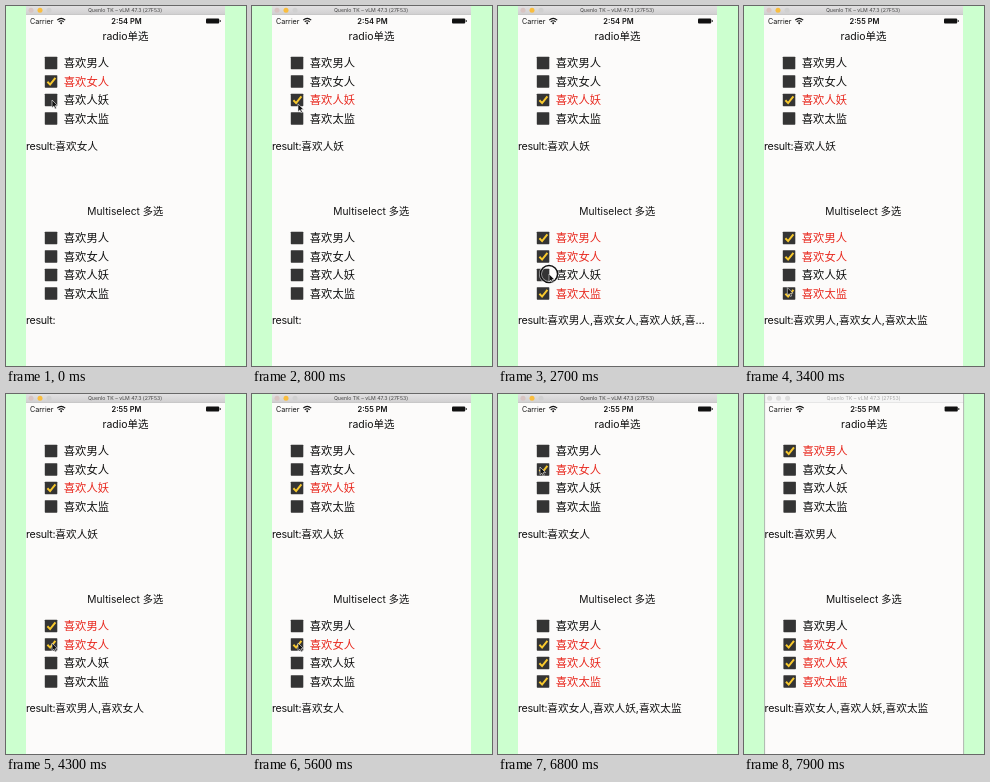
An HTML page that plays this animation: 240 by 360 pixels, repeating every 8000 ms.

```html
<!DOCTYPE html>
<html lang="zh">
<head>
<meta charset="utf-8">
<title>Radio and multiselect</title>
<style>
html, body { margin: 0; width: 100%; height: 100%; overflow: hidden; background: #ccffcf; }
svg { display: block; width: 100vw; height: 100vh; }
text { font-family: Inter, "Noto Sans CJK SC", "Noto Sans CJK", sans-serif; fill: #111; }
.mid { text-anchor: middle; }
.result { font-size: 10.7px; }
.word { letter-spacing: -.3px; }
</style>
</head>
<body>
<svg id="stage" viewBox="0 0 240 360">
  <defs>
    <linearGradient id="chrome" x2="0" y2="1">
      <stop offset="0" stop-color="#e2e1e2"/>
      <stop offset="1" stop-color="#d0cfd0"/>
    </linearGradient>
  </defs>
  <rect width="240" height="360" fill="#ccffcf"/>
  <g id="phone">
    <rect x="20" width="199" height="360" fill="#fcfbfa"/>
    <rect id="bar" x="20" width="199" height="8.6"/>
    <rect id="rule" x="20" y="8.4" width="199" height=".6"/>
    <path id="edges" d="M20 0V360M219 0V360" stroke="#999" stroke-width=".7"/>
    <g id="lights"></g>
    <text id="title" class="mid" x="119" y="6.1" font-size="5.2">Quenlo TK – vLM 47.3 (27F53)</text>
    <text x="24" y="17.6" font-size="7.2">Carrier</text>
    <g fill="none" stroke="#111" stroke-width="1.1">
      <path d="M51.2 14.2q4-3.6 8 0M52.7 15.9q2.5-2.2 5 0"/>
      <circle cx="55.2" cy="17.3" r=".4"/>
    </g>
    <text id="clock" class="mid" x="120.5" y="17.7" font-size="7.5" font-weight="600"></text>
    <rect x="200" y="12.5" width="13.2" height="5" rx="1" fill="#111"/>
    <rect x="213.7" y="14" width="1" height="2" rx=".5" fill="#111"/>
    <text class="mid" x="119.5" y="34.3" font-size="10.5">radio单选</text>
    <text class="mid" x="119.2" y="209.2" font-size="10.2">Multiselect 多选</text>
    <g id="rows"></g>
    <text class="result" x="20" y="144"><tspan class="word">result:</tspan><tspan id="radioResult"></tspan></text>
    <text class="result" x="20" y="318"><tspan class="word">result:</tspan><tspan id="multiResult"></tspan></text>
  </g>
  <g id="cursor">
    <g id="ring" fill="none">
      <circle r="8.6" stroke="#fff" stroke-opacity=".6" stroke-width="3"/>
      <circle r="8.6" stroke="#111" stroke-width="1.5"/>
    </g>
    <path d="M0 0V7.8L1.9 6.1 3.1 8.9 4.4 8.3 3.2 5.6H5.6Z" fill="#111" stroke="#eee" stroke-width=".6"/>
  </g>
</svg>
<script>
const LOOP = 8000, STEP = 100;
const NAMES = ['喜欢男人', '喜欢女人', '喜欢人妖', '喜欢太监'];
const RED = '#e8291f';
const $ = id => document.getElementById(id);

function add(parent, tag, attrs) {
  const el = document.createElementNS('http://www.w3.org/2000/svg', tag);
  for (const k in attrs) el.setAttribute(k, attrs[k]);
  parent.appendChild(el);
  return el;
}

function makeRow(y, name) {
  add($('rows'), 'rect', { x: 38.8, y: y - 6.3, width: 12.5, height: 12.5, rx: .6, fill: '#343434' });
  const tick = add($('rows'), 'path', {
    d: `M41.4 ${y + .3}L44.1 ${y + 3.1} 49.4 ${y - 3.7}`,
    fill: 'none', stroke: '#f8c92e', 'stroke-width': 2
  });
  const label = add($('rows'), 'text', { x: 57.8, y: y + 4.1, 'font-size': 11.3 });
  label.textContent = name;
  return on => {
    tick.style.display = on ? '' : 'none';
    label.style.fill = on ? RED : '#111';
  };
}

const makeList = top => NAMES.map((name, i) => makeRow(top + i * 18.5, name));
const radio = makeList(57), multi = makeList(232);
const lights = [25, 34, 43].map(cx => add($('lights'), 'circle', { cx, cy: 4.3, r: 2.5 }));

// Presses: time, list, item
const presses = [
  [300, 'radio', 2], [1400, 'multi', 0], [1900, 'multi', 1], [2200, 'multi', 2],
  [2400, 'multi', 3], [2700, 'multi', 2], [3700, 'multi', 3], [5400, 'multi', 0],
  [5900, 'multi', 2], [6200, 'multi', 3], [6600, 'radio', 1], [7400, 'radio', 0]
];

// Pointer path: time, x, y
const path = [
  [0, 46, 94], [900, 46, 98], [1300, 45, 230], [1500, 45, 231], [1800, 41, 250],
  [2000, 41, 250], [2200, 46, 268], [2400, 48, 286], [2500, 48, 286], [2700, 51, 268],
  [3000, 50, 269], [3600, 41, 286], [3800, 41, 286], [4200, 46, 249], [4800, 46, 250],
  [5300, 38, 232], [5500, 38, 232], [5600, 46, 249], [5900, 46, 268], [6000, 46, 268],
  [6200, 45, 286], [6300, 45, 286], [6600, 42, 73], [6900, 42, 73], [7300, 45, 57], [8000, 45, 58]
];

function pointerAt(t) {
  const i = path.findIndex(p => p[0] > t);
  const [t0, x0, y0] = path[i - 1], [t1, x1, y1] = path[i];
  const u = (t - t0) / (t1 - t0), k = u * u * (3 - 2 * u);
  return [x0 + (x1 - x0) * k, y0 + (y1 - y0) * k];
}

function stateAt(t) {
  const state = { radio: 1, multi: [false, false, false, false] };
  for (const [at, list, i] of presses) {
    if (at > t) break;
    if (list === 'radio') state.radio = i;
    else state.multi[i] = !state.multi[i];
  }
  return state;
}

function multiText(flags) {
  const chosen = NAMES.filter((_, i) => flags[i]);
  const text = chosen.join(',');
  return chosen.length === 4 ? text.slice(0, 16) + '…' : text;
}

function draw(t) {
  // The result lines follow a press one step later
  const now = stateAt(t), shown = stateAt(t - STEP);
  radio.forEach((set, i) => set(i === now.radio));
  multi.forEach((set, i) => set(now.multi[i]));
  $('radioResult').textContent = NAMES[shown.radio];
  $('multiResult').textContent = multiText(shown.multi);
  $('clock').textContent = t < 3300 ? '2:54 PM' : '2:55 PM';

  const blurred = t >= 7900;
  $('phone').setAttribute('transform', `translate(${blurred ? .6 : 0} 0)`);
  $('bar').setAttribute('fill', blurred ? '#f5f5f5' : 'url(#chrome)');
  $('rule').setAttribute('fill', blurred ? '#dcdcdc' : '#b8b7b8');
  $('edges').style.display = blurred ? '' : 'none';
  $('title').style.fill = blurred ? '#aaa' : '#444';
  const tints = blurred ? ['#ddd', '#ddd', '#ddd'] : ['#d8c4c2', '#f9bd3e', '#d0d0d0'];
  lights.forEach((el, i) => el.setAttribute('fill', tints[i]));

  const [x, y] = pointerAt(t);
  $('cursor').setAttribute('transform', `translate(${x} ${y})`);
  $('cursor').style.display = blurred ? 'none' : '';
  $('ring').style.display = presses.some(p => t >= p[0] && t < p[0] + 2 * STEP) ? '' : 'none';
}

const start = performance.now();
function tick() {
  const t = (performance.now() - start) % LOOP;
  draw(Math.floor(t / STEP) * STEP);
  requestAnimationFrame(tick);
}
tick();
</script>
</body>
</html>
```
